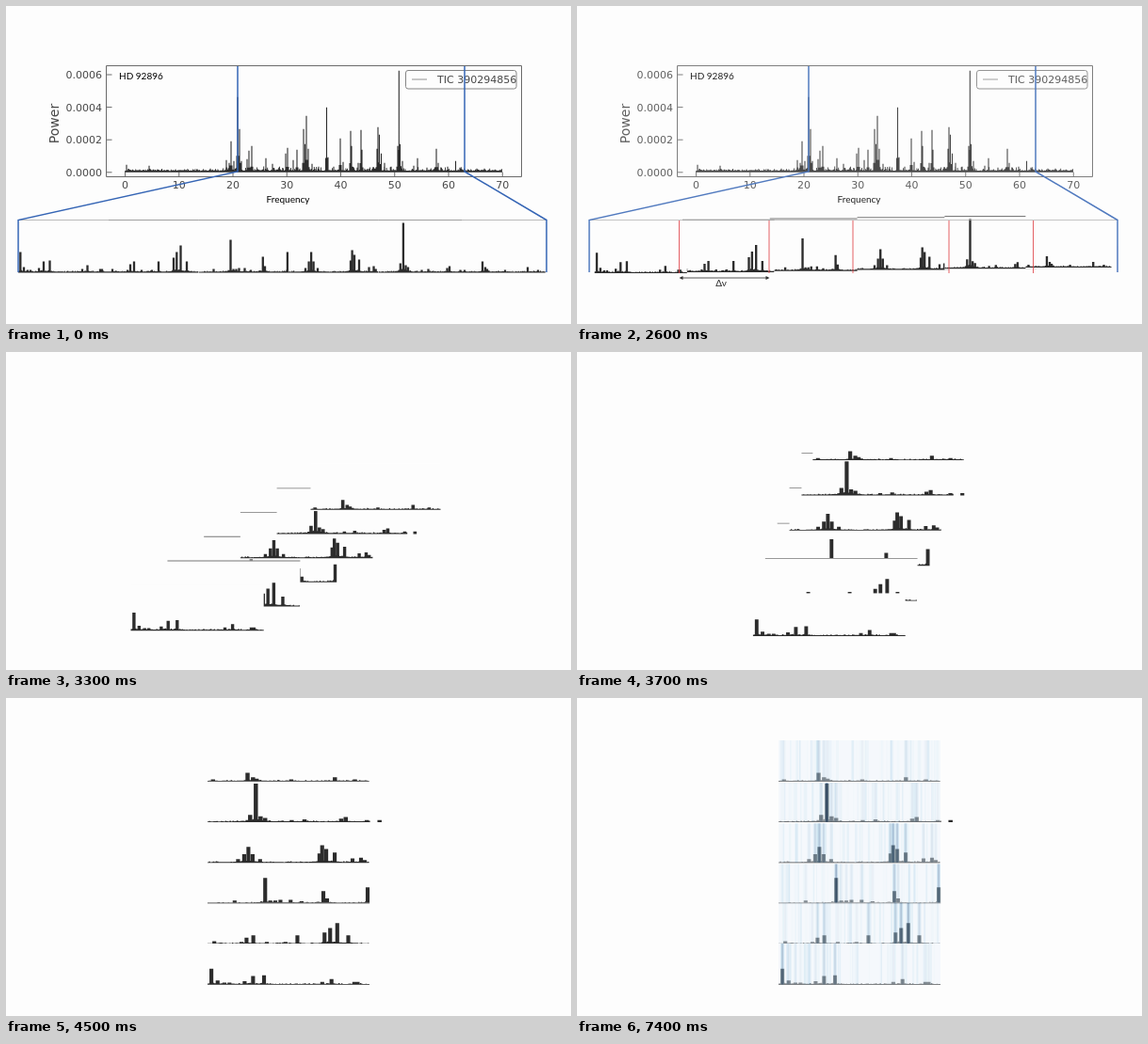
These frames come from a looping animation (600x338 px, 8000 ms). An HTML page:

```html
<!DOCTYPE html>
<html lang="en">
<head>
<meta charset="utf-8">
<title>Folding a power spectrum</title>
<style>
  html, body { margin: 0; width: 100%; height: 100%; overflow: hidden; background: #fdfdfd; }
  svg { display: block; width: 100vw; height: 100vh; }
  .axis { fill: none; stroke: #6a6a6a; stroke-width: 1; }
  .tick { font: 11px "DejaVu Sans", sans-serif; fill: #484848; }
  .power { font: 14px "DejaVu Sans", sans-serif; fill: #484848; }
  .note { font: 10px Lato, sans-serif; fill: #000; }
  .dark { fill: #2c2c2c; }
  .zoom { fill: none; stroke: #3565b5; stroke-width: 1.5; }
  .red { fill: none; stroke: #e0474c; stroke-width: 1; }
  .edge { fill: none; stroke: #777; stroke-width: 1; }
</style>
</head>
<body>
<svg viewBox="0 0 600 338" preserveAspectRatio="none">
  <g id="rows"></g>
  <g id="plot">
    <path class="axis" id="axes" d="M106.5 63.5H547.5V181.5H106.5Z"/>
    <g id="labels"></g>
    <text class="power" text-anchor="middle" transform="translate(56 125) rotate(-90)">Power</text>
    <path class="dark" id="spectrum"/>
    <rect x="424.5" y="68.5" width="117.5" height="19.5" rx="2.5" fill="#fdfdfd" stroke="#858585"/>
    <path d="M431 78H447" stroke="#777" stroke-width=".8"/>
    <text class="tick" x="458" y="82">TIC 390294856</text>
    <text class="note" x="120" y="77.5">HD 92896</text>
    <text class="note" x="299.5" y="208.5" text-anchor="middle">Frequency</text>
    <path d="M13 227.5H574" stroke="#aaa" stroke-width=".8"/>
    <path class="zoom" d="M246 64V176L13 227.5V283M487 64V176L574 227.5V283"/>
    <g id="split">
      <path class="red" d="M108.5 228V284M204 228V284M293 228V284M395 228V284M484.5 228V284"/>
      <path d="M110 289H203" stroke="#222" stroke-width=".9"/>
      <path d="M108.5 289l4-2v4zM204.5 289l-4-2v4z" fill="#111"/>
      <text class="note" x="153" y="297.5" text-anchor="middle">Δν</text>
    </g>
  </g>
</svg>
<script>
const LOOP = 8000, HOLD = 100;
const $ = id => document.getElementById(id);
const clamp = v => Math.max(0, Math.min(1, v));
const mix = (a, b, p) => a + (b - a) * p;

function make(tag, attrs, parent) {
  const el = document.createElementNS('http://www.w3.org/2000/svg', tag);
  for (const k in attrs) el.setAttribute(k, attrs[k]);
  return parent.appendChild(el);
}

function seeded(s) {
  return () => (s = (s * 16807) % 2147483647) / 2147483647;
}

const bar = (x, h, w, base) =>
  `M${(x - w / 2).toFixed(2)} ${base}v${-h.toFixed(2)}h${w}v${h.toFixed(2)}z`;

// Upper plot: [x, height] of the visible peaks
const peaks = [
  [128, 8], [142, 3], [152, 7], [217, 4], [234, 13], [237, 10], [239, 33], [242, 12],
  [246, 80], [248, 46], [250, 12], [256, 14], [258, 23], [261, 28], [276, 15], [283, 9],
  [297, 20], [299, 26], [305, 13], [309, 24], [316, 46], [317.5, 30], [319, 60], [321, 25],
  [325, 9], [332, 6], [340.5, 69], [342, 16], [348, 6], [355, 36], [358, 11], [366, 44],
  [367, 28], [374, 10], [377, 45], [378, 24], [394, 25], [395, 48], [396.5, 40], [398.5, 20],
  [402, 10], [409, 6], [416, 28], [417.3, 108], [418.5, 30], [421, 12], [433, 7], [437, 15],
  [447, 5], [457, 25], [459, 10], [469, 6], [477.5, 12], [482, 5], [500, 4], [508, 4]
];

// Strip pieces from low to high frequency: [x, height] within each piece
const pieces = [
  [[2.3, 22], [6, 6], [10, 3], [13, 3], [22, 5], [27, 12], [33.5, 13], [68, 4], [73.5, 8], [87, 4], [89, 4]],
  [[4, 4], [20, 3], [23, 9], [27, 12], [35, 3], [46, 3], [53, 12], [69, 16], [72.3, 22], [76.5, 29], [83, 12]],
  [[16, 4], [34, 35], [37, 4], [40, 4], [43, 5], [49, 5], [55.5, 3], [68.3, 17], [70.5, 7], [94.4, 22]],
  [[18, 5], [21.6, 12], [24.1, 22], [26.6, 12], [31, 5], [66, 13], [67.6, 24], [70, 19], [75, 14], [85.5, 6], [90.5, 7], [92.7, 4]],
  [[23.3, 10], [26.4, 53], [29, 8], [31.5, 6], [46, 3], [53, 4], [73, 5], [75.5, 7], [87, 3], [94, 3]],
  [[3, 3], [22, 12], [25, 6], [27, 4], [46, 3], [70, 6], [81, 3]]
];
const cuts = [13, 109, 204.5, 300, 395.5, 484, 573];
const stack = [2, 1, 0, 3, 4, 5];

function drawAxes() {
  let ticks = '';
  for (let i = 0; i < 8; i++) {
    const x = 126.5 + i * 57.25;
    ticks += `M${x} 181.5v-5`;
    make('text', { class: 'tick', x, y: 194, 'text-anchor': 'middle' }, $('labels')).textContent = i * 10;
  }
  for (let i = 0; i < 4; i++) {
    const y = 176.8 - i * 34.6;
    ticks += `M106.5 ${y}h6`;
    make('text', { class: 'tick', x: 102, y: y + 4, 'text-anchor': 'end' }, $('labels')).textContent = (i * 2e-4).toFixed(4);
  }
  $('axes').setAttribute('d', $('axes').getAttribute('d') + ticks);

  const rnd = seeded(77);
  let d = '';
  for (let x = 126.5; x < 527; x += .8) {
    const busy = x > 230 && x < 490 ? 2.2 : 1;
    d += bar(x, 1.6 + rnd() * .8 + busy * rnd() ** 3 * 1.8, .9, 176.8);
  }
  for (const [x, h] of peaks) {
    d += bar(x, h, 1.1, 176.8);
    if (h > 20) d += bar(x, h * .22, 3, 176.8);
  }
  $('spectrum').setAttribute('d', d);
}

function drawPiece(i) {
  const rnd = seeded(101 + i * 37), base = 56.5, w = cuts[i + 1] - cuts[i], bars = pieces[i];
  const g = make('g', {}, $('rows'));
  make('rect', { width: w, height: 58, fill: '#fdfdfd' }, g);
  if (i > 0 && i < 5) make('path', { class: 'edge', d: `M0 .5H${w}` }, g);

  let d = '';
  for (let x = .4; x < w; x += .8) {
    let hump = 0;
    for (const [bx, h] of bars) hump += h * .06 * Math.exp(-Math.abs(x - bx) / 3);
    d += bar(x, 1.1 + rnd() ** 3 * 1.1 + Math.min(hump, 3.5), .82, base);
  }
  for (const [x, h] of bars) d += bar(x, h, 2.3, base);
  make('path', { class: 'dark', d }, g);

  const heat = make('g', { opacity: 0 }, g);
  const streak = (x, width, fill, opacity) =>
    make('rect', { x, y: 0, width: Math.min(width, w - x), height: 56, fill, opacity }, heat);
  streak(0, w, '#eef5fc', 1);
  for (let n = 0; n < 55; n++) streak(rnd() * (w - 2), .4 + rnd() * 1.1, '#6baed6', .03 + rnd() ** 2 * .24);
  for (const [x, h] of bars) {
    streak(Math.max(0, x - 1.1), 2.2, '#6baed6', Math.min(.5, h / 40));
    streak(x - .5, 1, '#08306b', Math.min(.75, h / 60));
  }
  return { i, g, heat, w };
}

drawAxes();
const rows = stack.map(drawPiece);

function draw(now) {
  // Poses are held for a tenth of a second
  const t = Math.floor((now % LOOP) / HOLD) * HOLD;
  const u = clamp((t - 2500) / 2000);
  const p = 1 - (1 - u ** 1.6) ** 3.44;
  const glow = .52 * clamp((t - 6500) / 600);

  $('split').setAttribute('visibility', t < 500 ? 'hidden' : 'visible');
  $('plot').setAttribute('opacity', 1 - clamp((t - 2500) / 700));
  for (const { i, g, heat, w } of rows) {
    const x = mix(cuts[i], 214, p), y = mix(227, 45 + 43.2 * (5 - i), p);
    g.setAttribute('transform', `translate(${x} ${y}) scale(${mix(1, 172 / w, p)} ${mix(1, 45 / 58, p)})`);
    heat.setAttribute('opacity', glow);
  }
}

const start = performance.now();
function frame() {
  draw(performance.now() - start);
  requestAnimationFrame(frame);
}
frame();
</script>
</body>
</html>
```
